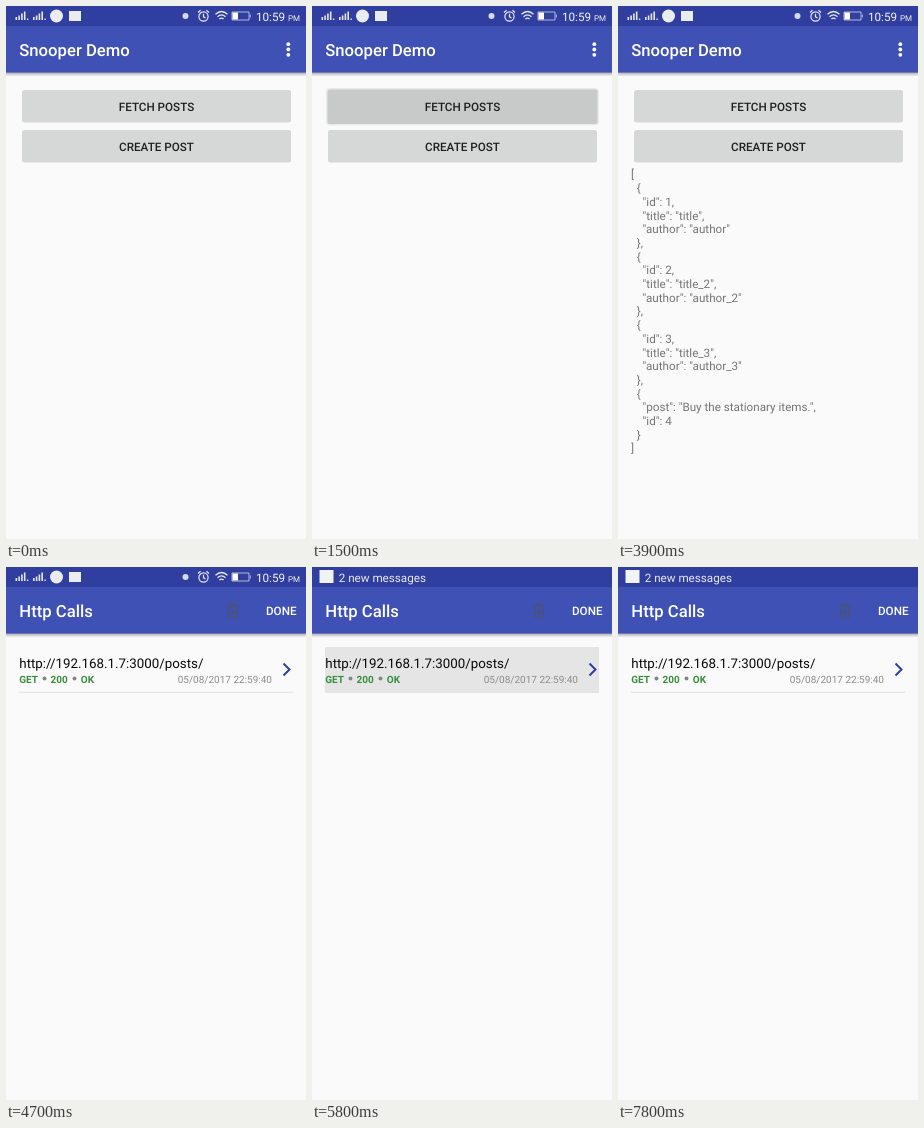
These frames come from a looping animation (300x533 px, 8 s). An HTML page:

```html
<!DOCTYPE html>
<html lang="en">
<head>
<meta charset="utf-8">
<title>Snooper Demo</title>
<style>
  html, body { margin: 0; width: 100%; height: 100%; overflow: hidden; background: #fafafa; }
  svg { display: block; width: 100%; height: 100%; }
  text { font-family: Roboto, sans-serif; font-size: 11.67px; white-space: pre; text-rendering: geometricPrecision; }
  .title { font-size: 16.67px; font-weight: 500; fill: #fff; }
  .label { font-weight: 500; fill: #1f1f1f; text-anchor: middle; }
  .json { fill: #757575; }
  .url { font-size: 13.33px; fill: #080808; }
  .ok { font-size: 10px; font-weight: 700; fill: #388e3c; }
  .date { font-size: 10px; fill: #8c8c8c; text-anchor: end; }
  .line { fill: none; stroke: #e4e8ee; }

  .anim { animation: 8s linear infinite both; }
  #press { animation-name: press; }
  #posts { animation-name: posts; }
  #calls { animation-name: enter; }
  #icons { animation-name: iconsOut; }
  #ticker { animation-name: tickerIn; }
  #rowPress { animation-name: rowPress; }

  @keyframes press {
    0%, .4% { opacity: 0; }
    3.75%, 22% { opacity: 1; }
    26.5%, 100% { opacity: 0; }
  }
  @keyframes posts {
    0%, 26.86% { opacity: 0; }
    26.87%, 100% { opacity: 1; }
  }
  @keyframes enter {
    0%, 49.4% { opacity: 0; transform: translateY(42px); animation-timing-function: cubic-bezier(0, 0, .2, 1); }
    55%, 100% { opacity: 1; transform: none; }
  }
  @keyframes iconsOut {
    0%, 67% { opacity: 1; transform: none; }
    70.8%, 100% { opacity: 0; transform: translateY(-20px); }
  }
  @keyframes tickerIn {
    0%, 67% { opacity: 0; transform: translateY(20px); }
    70.8%, 100% { opacity: 1; transform: none; }
  }
  @keyframes rowPress {
    0%, 68% { opacity: 0; }
    72%, 95.6% { opacity: 1; }
    97.4%, 100% { opacity: 0; }
  }
</style>
</head>
<body>
<svg viewBox="0 0 300 533" preserveAspectRatio="none">
  <defs>
    <linearGradient id="fade" x2="0" y2="1">
      <stop stop-opacity=".28"/>
      <stop offset="1" stop-opacity="0"/>
    </linearGradient>
    <clipPath id="bar"><rect width="300" height="20"/></clipPath>
    <g id="page">
      <rect width="300" height="580" fill="#fafafa"/>
      <rect y="20" width="300" height="46.7" fill="#3f51b5"/>
      <rect y="66.7" width="300" height="4" fill="url(#fade)"/>
    </g>
    <path id="signal" fill="#e4e8ee" d="M0 11h1.6v3H0zM2.8 9.5h1.6v4.5H2.8zM5.6 7.5h1.6v6.5H5.6zM8.4 5.5H10v8.500H8.400zM11.400 12.500h1.400v1.500h-1.400z"/>
  </defs>

  <g id="home">
    <use href="#page"/>
    <text class="title" x="13.3" y="49.7">Snooper Demo</text>
    <g fill="#fff">
      <circle cx="282.3" cy="38.2" r="1.9"/>
      <circle cx="282.3" cy="43.5" r="1.9"/>
      <circle cx="282.3" cy="48.8" r="1.9"/>
    </g>
    <rect x="16" y="84" width="269" height="32.5" rx="2.5" fill="#d6d7d7"/>
    <g id="press" class="anim">
      <rect x="14" y="82" width="273" height="37.5" rx="4" fill="#e9e9e9"/>
      <rect x="15.5" y="83.5" width="270" height="34.5" rx="2.5" fill="#c8c9c9"/>
    </g>
    <rect x="16" y="124" width="269" height="32.5" rx="2.5" fill="#d6d7d7"/>
    <text class="label" x="150.5" y="104.5">FETCH POSTS</text>
    <text class="label" x="150.5" y="144.5">CREATE POST</text>
    <g id="posts" class="anim"></g>
  </g>

  <g id="calls" class="anim">
    <use href="#page"/>
    <text class="title" x="13.3" y="49.7">Http Calls</text>
    <g fill="none" stroke="#4d5468" stroke-width="1.2">
      <path d="M220.500 39h13M224.500 38.500v-1.500h5v1.500M222.500 40v10.500h9V40"/>
      <path d="M225 42.500l4 5M229 42.500l-4 5"/>
    </g>
    <text x="260" y="48.2" font-weight="500" fill="#fff">DONE</text>
    <rect id="rowPress" class="anim" x="13" y="80" width="274" height="45.5" fill="#e5e5e5"/>
    <path d="M13 125.300H287" stroke="#dcdcdc" stroke-width=".8"/>
    <text class="url" x="13.3" y="101.2">http://192.168.1.7:3000/posts/</text>
    <text class="ok" x="13.3" y="115.5">GET</text>
    <text class="ok" x="44.6" y="115.5">200</text>
    <text class="ok" x="74.8" y="115.5">OK</text>
    <g fill="#858585">
      <circle cx="38.5" cy="111.5" r="2"/>
      <circle cx="68.5" cy="111.5" r="2"/>
    </g>
    <text class="date" x="266" y="115.5">05/08/2017 22:59:40</text>
    <path d="M277.500 96.500l6 6-6 6" fill="none" stroke="#303f9f" stroke-width="2"/>
  </g>

  <g clip-path="url(#bar)">
    <rect width="300" height="20" fill="#303f9f"/>
    <g id="icons" class="anim">
      <use href="#signal" x="9.5"/>
      <use href="#signal" x="27"/>
      <circle cx="50.5" cy="10" r="6.5" fill="#e9edf2"/>
      <rect x="63" y="5" width="12" height="10" fill="#e9edf2"/>
      <circle cx="179.5" cy="10" r="3" fill="#d5dbe6"/>
      <g class="line" stroke-width="1.2">
        <circle cx="197.5" cy="10.5" r="4.6"/>
        <path d="M197.500 7.800v3l2 1.200M192 6.500l2.600-2.300M203 6.500l-2.600-2.300"/>
        <path d="M209.500 8.200q6-5.400 12 0M211.500 10.700q4-3.600 8 0M213.400 13q2.100-1.800 4.200 0"/>
        <path d="M226 6h17v8h-17zM244.300 8.500v3" stroke-width=".9" opacity=".8"/>
      </g>
      <rect x="226.5" y="6.5" width="5.5" height="7" fill="#fff"/>
      <text x="250" y="14.5" fill="#f0f3f7">10:59</text>
      <text x="282" y="14.5" fill="#f0f3f7" style="font-size:8px">PM</text>
    </g>
    <g id="ticker" class="anim">
      <rect x="7.5" y="3" width="14" height="13" fill="#f0f3f7"/>
      <text x="26.7" y="14.5" fill="#e6eaf0">2 new messages</text>
    </g>
  </g>
</svg>
<script>
  const entry = (id, title, author) => ({ id, title, author });
  const data = [
    entry(1, 'title', 'author'),
    entry(2, 'title_2', 'author_2'),
    entry(3, 'title_3', 'author_3'),
    { post: 'Buy the stationary items.', id: 4 }
  ];
  const posts = document.getElementById('posts');
  JSON.stringify(data, null, 2).split('\n').forEach((line, i) => {
    const text = document.createElementNS(posts.namespaceURI, 'text');
    text.setAttribute('class', 'json');
    text.setAttribute('x', 13);
    text.setAttribute('y', 172.4 + i * 13.7);
    text.textContent = line;
    posts.append(text);
  });
</script>
</body>
</html>
```
